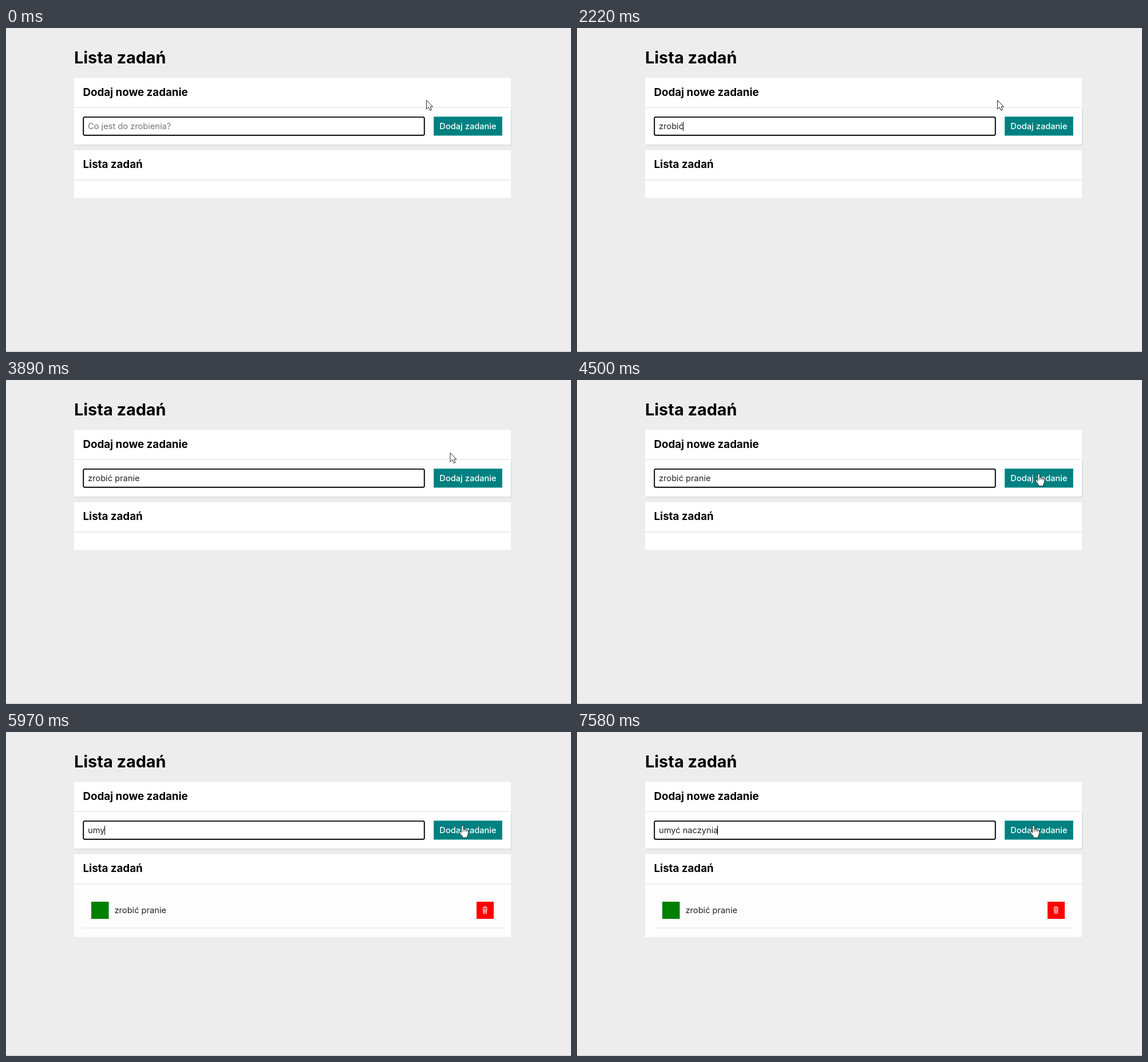
An HTML page that plays this animation: 987x567 px, repeating every 8 s.

```html
<!DOCTYPE html>
<html lang="pl">
<head>
<meta charset="utf-8">
<title>Lista zadań</title>
<style>
  html, body { margin: 0; width: 100%; height: 100%; overflow: hidden; background: #ededed; }
  svg { display: block; width: 987px; height: 567px; }
  text { font: 400 14.65px Inter, "Open Sans", sans-serif; fill: #222; white-space: pre; }
  .title { font-size: 28.8px; font-weight: 700; fill: #000; }
  .heading { font-size: 18.7px; font-weight: 700; fill: #000; }
  .panel { fill: #fff; }
  .pointer { fill: #fff; stroke: #222; stroke-linejoin: round; }
</style>
</head>
<body>
<svg viewBox="0 0 987 567" xmlns="http://www.w3.org/2000/svg">
  <defs>
    <filter id="shadow" x="-5%" y="-20%" width="110%" height="140%">
      <feDropShadow dx="1" dy="1" stdDeviation="1" flood-opacity=".12"/>
    </filter>
  </defs>
  <rect width="987" height="567" fill="#ededed"/>
  <rect y="566" width="987" height="1" fill="#c4c4c4"/>
  <text class="title" x="119" y="62">Lista zadań</text>

  <rect class="panel" x="119" y="87.5" width="763" height="51"/>
  <rect class="panel" x="119" y="140" width="763" height="64" filter="url(#shadow)"/>
  <text class="heading" x="134.5" y="119">Dodaj nowe zadanie</text>
  <rect id="field" fill="#fff"/>
  <text id="entry" x="143" y="176.8"></text>
  <rect id="caret" y="164" width="1" height="16" fill="#000"/>
  <rect x="747.5" y="155.5" width="119" height="32.5" fill="#008080" stroke="#1b9c9c"/>
  <text x="807" y="176.8" text-anchor="middle" style="fill:#fff;font-weight:500">Dodaj zadanie</text>

  <rect class="panel" x="119" y="214" width="763" height="51"/>
  <text class="heading" x="134.5" y="245.3">Lista zadań</text>
  <rect id="list" class="panel" x="119" y="267" width="763" height="30"/>
  <g id="task">
    <rect x="149" y="297" width="30.5" height="30" fill="#008000"/>
    <text x="189.5" y="316.5">zrobić pranie</text>
    <rect x="822" y="297" width="30" height="30" fill="#f00"/>
    <g fill="none" stroke="#fff" stroke-width=".9">
      <path d="M832.5 307.3H841M835 307V305.6H838.5V307M833.3 308.2L834.2 317.4H839.4L840.2 308.2"/>
      <path d="M835.4 308.5V316.5M836.8 308.5V316.5M838.2 308.5V316.5M834 311H839.7M834 314H839.5" stroke-width=".6"/>
    </g>
    <rect x="134.5" y="342" width="732.5" height="2" fill="#ededed"/>
  </g>

  <path id="arrow" class="pointer" d="M.5 .5V16L4.2 12.8L6.8 18.4L9.4 17.2L7 11.8H11.5Z"/>
  <g id="hand" class="pointer">
    <path d="M5 13V2.2Q5.2 .6 6.6 .6Q8 .6 8.2 2.2V7.2Q10.2 6.3 11 7.8Q12.8 7 13.7 8.6Q16.2 8.1 16.4 10.5V15Q16.2 17.6 14.6 19.5V22H6.2V20Q4.7 17.5 2.6 15.2Q.2 12.4 1.2 11.3Q2.8 10.2 5 13Z"/>
    <path d="M8.2 7V11.5M11 8V11.5M13.7 8.8V11.8" fill="none" stroke-width=".8"/>
  </g>
</svg>
<script>
const LOOP = 8000;
const ADDED = 4700;
const PLACEHOLDER = 'Co jest do zrobienia?';
const $ = id => document.getElementById(id);
const [field, entry, caret, list, task, arrow, hand] =
  ['field', 'entry', 'caret', 'list', 'task', 'arrow', 'hand'].map($);

const words = [
  { text: 'zrobić pranie', times: [1430, 1560, 1690, 1820, 1950, 2220, 2350, 2550, 2630, 2710, 2780, 2860, 2940] },
  { text: 'umyć naczynia', times: [5570, 5770, 5970, 6370, 6500, 6780, 6830, 6980, 7100, 7240, 7440, 7510, 7580] }
];

// Intervals in which the caret is visible.
const caretOn = [[420, 950], [1430, 3470], [4000, 4500], [ADDED, 5300], [5570, LOOP]];

const pointerSteps = [
  { at: 0, x: 734, y: 126 },
  { at: 3890, x: 775.5, y: 127 },
  { at: 3970, x: 785, y: 134 },
  { at: 4050, x: 793, y: 145 },
  { at: 4130, x: 795, y: 156, over: true },
  { at: 4210, x: 799, y: 161, over: true },
  { at: 4300, x: 801, y: 164, over: true },
  { at: 4500, x: 800, y: 163.5, over: true },
  { at: ADDED, x: 799, y: 162, over: true },
  { at: 4770, x: 791, y: 163, over: true }
];

const show = (el, on) => el.setAttribute('visibility', on ? 'visible' : 'hidden');
const set = (el, attrs) => Object.entries(attrs).forEach(([k, v]) => el.setAttribute(k, v));

function typedAt(t) {
  const { text, times } = words[t < ADDED ? 0 : 1];
  return text.slice(0, times.filter(at => at <= t).length);
}

function render(t) {
  const typed = typedAt(t);
  entry.textContent = typed || PLACEHOLDER;
  entry.style.fill = typed ? '#222' : '#757575';
  caret.setAttribute('x', 143 + (typed ? Math.round(entry.getComputedTextLength()) - 1 : 0));
  show(caret, caretOn.some(([from, to]) => t >= from && t < to));

  const blurred = t >= 4570 && t < ADDED;
  set(field, blurred
    ? { x: 135.5, y: 156.5, width: 595, height: 31, rx: 0, stroke: '#ddd', 'stroke-width': 1 }
    : { x: 135.2, y: 155.9, width: 595.6, height: 31.9, rx: 2.5, stroke: '#000', 'stroke-width': 1.9 });

  const added = t >= ADDED;
  show(task, added);
  set(list, { height: added ? 92 : 30 });
  list.style.fill = added ? '#fdfdfd' : '#fff';

  const { x, y, over } = pointerSteps.filter(s => s.at <= t).pop();
  show(arrow, !over);
  show(hand, over);
  (over ? hand : arrow).setAttribute('transform', `translate(${x} ${y})`);
}

const start = performance.now();
function tick() {
  render((performance.now() - start) % LOOP);
  requestAnimationFrame(tick);
}
tick();
</script>
</body>
</html>
```
